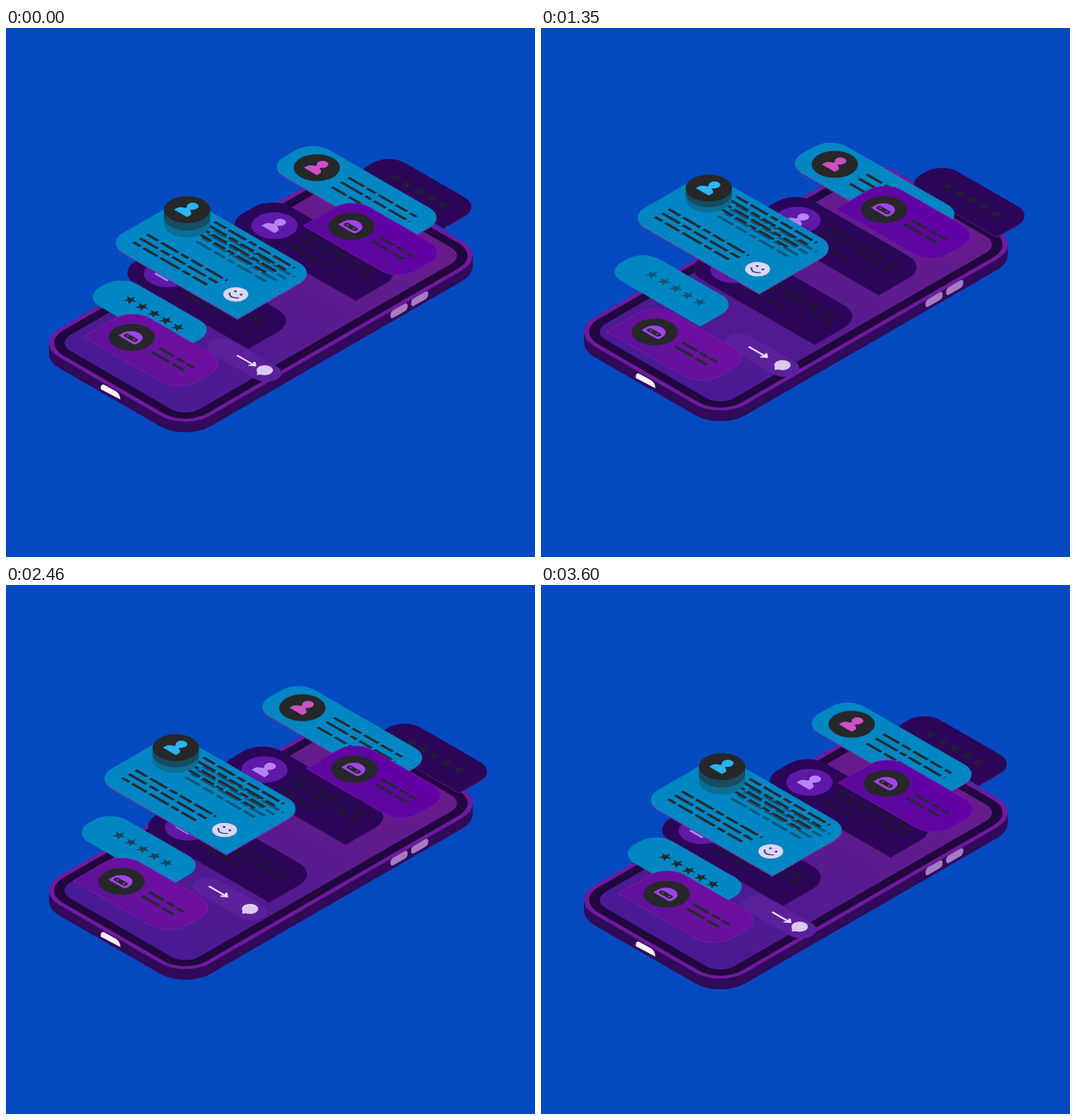
Animation of 640x640 px, one loop 3.63 s. Source, as an HTML page:

```html
<!DOCTYPE html>
<html lang="en">
<head>
<meta charset="utf-8">
<title>Floating chat</title>
<style>
html, body { margin: 0; width: 100%; height: 100%; overflow: hidden; background: #034ac0; }
svg { display: block; width: 100vw; height: 100vh; }
</style>
</head>
<body>
<svg viewBox="0 0 640 640">
  <defs>
    <linearGradient id="screen" x1="0" y1="0" x2="0" y2="1">
      <stop offset="0" stop-color="#681c8b"/><stop offset="1" stop-color="#481a93"/>
    </linearGradient>
    <linearGradient id="violet" x1="0" y1="1" x2=".45" y2=".1">
      <stop offset="0" stop-color="#5a0a9c"/><stop offset="1" stop-color="#6202a5"/>
    </linearGradient>
    <linearGradient id="plum" x1="0" y1="1" x2=".45" y2=".1">
      <stop offset="0" stop-color="#5c1299"/><stop offset="1" stop-color="#6e0fa1"/>
    </linearGradient>
  </defs>
</svg>
<script>
const LOOP = 3630;
const INK = '#222a30', DISC = '#262729', BLUE = '#0086c3', NIGHT = '#2b0658';
const svg = document.querySelector('svg');
const parts = [];

function add(parent, tag, attrs = {}) {
  const node = document.createElementNS('http://www.w3.org/2000/svg', tag);
  for (const key in attrs) node.setAttribute(key, attrs[key]);
  parent.appendChild(node);
  return node;
}

// Flat plane: local x runs down-right, local y runs down-left.
const iso = (x, y) => `matrix(.866 .5 -.866 .5 ${x} ${y})`;
const plane = (parent, x, y) => add(parent, 'g', { transform: iso(x, y) });

// Moves by a(1 - cos) + b sin on each axis.
function floating(ax, ay, bx = 0, by = 0) {
  const node = add(svg, 'g');
  parts.push({ node, ax, ay, bx, by });
  return node;
}

// Rectangle with radii in the order top, right, bottom, left as seen on stage.
function slab(parent, w, h, radii, fill, extra = {}) {
  const [a, b, c, d] = radii;
  const arc = (r, x, y) => `A${r} ${r} 0 0 1 ${x} ${y}`;
  const path = `M${a} 0H${w - b}${arc(b, w, b)}V${h - c}${arc(c, w - c, h)}H${d}${arc(d, 0, h - d)}V${a}${arc(a, a, 0)}Z`;
  return add(parent, 'path', { d: path, fill, ...extra });
}

function card(parent, x, y, w, h, r, fill, edge) {
  const radii = [r, r, 0, r];
  if (edge) slab(plane(parent, x, y + 1.2), w, h, radii, edge);
  const face = plane(parent, x, y);
  slab(face, w, h, radii, fill);
  return face;
}

function text(parent, x, y, length, dashes, color) {
  return add(parent, 'path', {
    d: `M${x} ${y}h${length}`, stroke: color, 'stroke-width': 3.4, 'stroke-dasharray': dashes
  });
}

function disc(parent, x, y, fill) {
  const face = add(parent, 'g', { transform: `translate(${x} ${y})` });
  add(face, 'ellipse', { rx: 28, ry: 16.2, fill });
  return plane(face, 0, 0);
}

function person(face, fill) {
  add(face, 'circle', { cy: -8, r: 5.8, fill });
  add(face, 'path', { d: 'M-9 9V5Q-9 1-3-1V-4H3V-1Q9 1 9 5V9Z', fill });
}

function bot(face) {
  add(face, 'path', { d: 'M-11.5 7V1A11.5 11.5 0 0 1 11.5 1V4Q11.5 7 8.5 7Z', fill: '#a144ea' });
  add(face, 'rect', { x: -8.5, y: -2, width: 17, height: 6, rx: 3, fill: DISC });
  for (const x of [-4.5, 4.5]) add(face, 'circle', { cx: x, cy: 1, r: 1.1, fill: '#a144ea' });
}

function stars(face, x, y, fill) {
  const group = add(face, 'g', { fill });
  for (let i = 0; i < 5; i++) {
    const points = [];
    for (let k = 0; k < 10; k++) {
      const r = k % 2 ? 2.9 : 7.1, t = k * Math.PI / 5;
      points.push((x + i * 16.6 + r * Math.sin(t)).toFixed(2), (y - r * Math.cos(t)).toFixed(2));
    }
    add(group, 'polygon', { points: points.join(' ') });
  }
  return group;
}

// Vertical sweep of the avatar disc.
const sweep = (top, bottom) => `M-28 ${top}A28 16.2 0 0 1 28 ${top}V${bottom}A28 16.2 0 0 1-28 ${bottom}Z`;

function phone() {
  const g = floating(0, -8);
  const x = 399.7, y = 170, w = 211, h = 422, r = 35;
  const inset = (d, fill) => {
    const k = r - d;
    slab(plane(g, x, y + d), w - 2 * d, h - 2 * d, [k, k, k, k], fill);
  };
  const wall = '#310a5a';
  slab(plane(g, x, y + 13), w, h, [r, r, r, r], wall);
  add(g, 'path', { d: 'M52 381L564.6 275.5V288.5L52 394Z', fill: wall });
  inset(0, '#701a9f');
  inset(5, '#22063f');
  inset(15.5, 'url(#screen)');
  add(g, 'path', { d: 'M114.7 437V434Q115.5 430.2 119 431.8L133 439.6Q138 442.6 138.4 449.4Z', fill: '#f7f2f5' });
  for (const [bx, by] of [[475.5, 342], [500.5, 327.5]]) {
    add(g, 'rect', {
      x: -12, y: -4.7, width: 24, height: 9.4, rx: 4.2, fill: '#a67bc4',
      transform: `matrix(.866 -.5 0 1 ${bx} ${by})`
    });
  }
}

function ratingCard() {
  const g = add(svg, 'g');
  const face = card(g, 463.2, 152, 128, 52, 22, NIGHT, '#4d1277');
  stars(face, 33.5, 24.5, '#231d33');
  return g;
}

function userCard(g, x, y) {
  const face = card(g, x, y, 184, 68, 26, NIGHT, '#471070');
  text(face, 69, 21, 98, '17 4 9 4 24 4 12 4', '#1e1a2c');
  text(face, 69, 31, 98, '26 4 14 4 8 4 20 4', '#1e1a2c');
  text(face, 69, 46, 55, '22 4 14 4 5 4', '#1e1a2c');
  person(disc(g, x + 2.3, y + 35.6, '#5e19a8'), '#b784f3');
}

function botCard(g, x, y, fill, rim) {
  const face = plane(g, x, y);
  slab(face, 133, 68.5, [24, 24, 24, 0], fill, { stroke: rim, 'stroke-width': 1 });
  text(face, 66, 29, 49, '21 4 11 3 10 4', INK);
  text(face, 66, 39, 45, '25 4 16 4', INK);
  bot(disc(g, x - 1, y + 35, DISC));
}

function blueCard() {
  const g = floating(-12.15, -7.2, 0, 11.3);
  const face = card(g, 371, 136, 186.5, 63.5, 23, BLUE, '#79309a');
  text(face, 70, 20, 95, '22 4 12 4 20 4 16 4', INK);
  text(face, 70, 30.5, 96, '30 4 8 4 17 4 24 4', INK);
  text(face, 70, 43, 50, '20 4 16 4 6 4', INK);
  person(disc(g, 376, 169, DISC), '#d04fc5');
}

function starCard() {
  const g = floating(-9.4, -18);
  return stars(card(g, 139.5, 298.7, 133, 53.3, 23, BLUE), 36.5, 24, INK);
}

function mainCard() {
  const g = floating(-9.45, -18);
  const face = card(g, 216.8, 204.4, 184, 111, 24, BLUE, '#79309a');
  const dashes = ['16 4 24 4 10 4', '25 4 12 4 18 4', '10 4 20 4 27 4', '21 4 15 4 9 4'];
  [[72, 112], [81.5, 108], [91, 103]].forEach(([y, n], i) => text(face, 18.5, y, n, dashes[i], INK));
  for (const [shift, opacity] of [[11, .5], [0, 1]]) {
    const block = add(face, 'g', { opacity });
    dashes.forEach((d, i) => text(block, 50.5 + shift, 9.5 + shift + i * 8.5, 112 - i * 4, d, INK));
  }
  const smile = add(face, 'g', { transform: 'translate(153.2 82.5)' });
  add(smile, 'circle', { r: 12.3, fill: '#dfd4f4' });
  for (const x of [-4, 4]) add(smile, 'circle', { cx: x, cy: -3.4, r: 1.5, fill: '#17467f' });
  add(smile, 'path', { d: 'M-6.5 2Q0 10 6.5 2', fill: 'none', stroke: '#17467f', 'stroke-width': 1.6 });

  const badge = add(g, 'g', { transform: 'translate(219 219.7)' });
  const base = add(badge, 'path', { fill: '#0b6e96' });
  const middle = add(badge, 'path', { fill: '#154d62' });
  const lid = add(badge, 'g');
  person(disc(lid, 0, 0, DISC), '#2bb5f1');
  return { base, middle, lid };
}

function sendPill() {
  const g = floating(-12.35, -8.4, 0, 11.2);
  const face = plane(g, 261.4, 371.5);
  slab(face, 92, 30, [15, 15, 15, 15], '#5b209b');
  add(g, 'ellipse', { cx: 313, cy: 414, rx: 10, ry: 6.1, fill: '#dcc9ef' });
  add(g, 'path', { d: 'M304 415L303.5 419.8L311 419Z', fill: '#dcc9ef' });
  return add(face, 'path', {
    d: 'M0 14H25M20 10L25 14L20 18', fill: 'none', stroke: '#ebe0f8', 'stroke-width': 2.4
  });
}

phone();
const rating = ratingCard();
userCard(floating(20.5, -3, 4.5), 192.5, 261.8);
userCard(floating(-8.5, -6.74, 0, 6.7), 322.5, 203.5);
blueCard();
botCard(floating(0, -12, -4), 419, 205, 'url(#violet)', '#7610b0');
const blink = starCard();
const badge = mainCard();
const arrow = sendPill();
botCard(floating(-8.5, -6.74, 0, 6.7), 153, 339.3, 'url(#plum)', '#7d18ac');

const move = (node, x, y) => node.setAttribute('transform', `translate(${x.toFixed(2)} ${y.toFixed(2)})`);

function draw(ms) {
  const p = ms % LOOP / LOOP, t = p * 2 * Math.PI;
  const c = 1 - Math.cos(t), s = Math.sin(t);
  for (const { node, ax, ay, bx, by } of parts) move(node, ax * c + bx * s, ay * c + by * s);

  const slide = 1 - Math.abs(1 - 2 * p);
  move(rating, 29.5 * slide, 14.5 * slide);

  const pulse = (1 - Math.cos(4 * t)) / 2, drop = 4.6 * pulse;
  move(badge.lid, 0, drop);
  badge.middle.setAttribute('d', sweep(drop, (drop + 18) / 2));
  badge.base.setAttribute('d', sweep(drop, 17.5));
  blink.setAttribute('opacity', 1 - .5 * pulse);
  move(arrow, 24.6 + 10.4 * Math.cos(2 * t) - 2.5 * Math.sin(2 * t), 0);
}

const start = performance.now();
function tick() {
  draw(performance.now() - start);
  requestAnimationFrame(tick);
}
draw(0);
requestAnimationFrame(tick);
</script>
</body>
</html>
```
